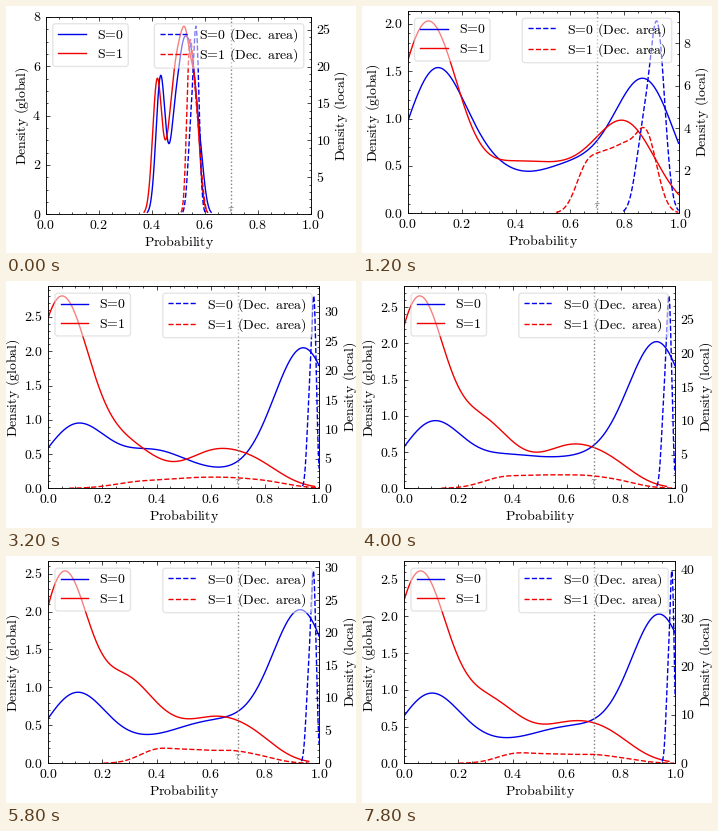
These frames come from a looping animation (350x247 px, 8 s). A matplotlib script:

```python
import math

import numpy as np
import matplotlib.pyplot as plt
from matplotlib.animation import FuncAnimation
from matplotlib.lines import Line2D
from matplotlib.patches import FancyBboxPatch
from matplotlib.ticker import NullFormatter
from matplotlib.transforms import Affine2D

W, H, DPI = 350, 247, 100
FRAMES, INTERVAL = 40, 200
EM = 10 * DPI / 72
DIGIT, DOT = 0.5 * EM, 0.278 * EM
TAU = 0.7
COLORS = "#0000ec", "#f00000"
T = np.linspace(0, 1, 1201)

plt.rcParams.update({
    "mathtext.fontset": "cm", "font.size": 10, "axes.linewidth": 0.5,
    "xtick.top": True, "lines.linewidth": 1.0,
})
for name in ("xtick", "ytick"):
    plt.rcParams.update({
        f"{name}.direction": "in", f"{name}.minor.visible": True,
        f"{name}.major.size": 3, f"{name}.minor.size": 1.5,
        f"{name}.major.width": 0.5, f"{name}.minor.width": 0.5,
    })

fig = plt.figure(figsize=(W / DPI, H / DPI), dpi=DPI, facecolor="white")
# pixel coordinates with the origin at the top left
px = Affine2D().scale(1 / DPI, -1 / DPI).translate(0, H / DPI) + fig.dpi_scale_trans


def peak(width, x, y):
    """One peak with a shoulder on its left side."""
    return width, x, y, x - 2 * width, y / 2


# Each density: kernel width, then a few points x, y that it passes through.
# Order: global S=0, global S=1, local S=0, local S=1.
KEYS = {
    0: ((.017, .433, 5.62, .463, 2.88, .49, 4.9, .52, 7.1, .55, 6.65, .58, 3.4),
        (.017, .42, 5.5, .449, 3.05, .475, 4.9, .5, 6.9, .528, 7.5, .562, 5.5),
        peak(.011, .568, 25.3),
        (.01, .54, 21.8, .555, 21, .572, 13.5, .588, 5.8)),
    6: ((.11, .1, 1.53, .28, .78, .44, .444, .6, .56, .74, .94, .88, 1.417),
        (.11, .074, 2.03, .22, 1.04, .36, .56, .52, .545, .66, .7, .81, .97),
        peak(.027, .922, 9),
        (.04, .66, 2.45, .73, 2.97, .8, 3.35, .88, 3.95)),
    10: ((.1, .16, 1.02, .3, .88, .42, .76, .54, .55, .7, .89, .88, 1.86),
         (.08, .07, 2.06, .2, 1.28, .31, 1.41, .49, .705, .63, .86, .8, .52),
         peak(.028, .919, 11.3),
         (.06, .49, 2, .62, 3.08, .74, 2.2, .86, .85)),
    16: ((.11, .1, .945, .25, .67, .4, .565, .59, .325, .77, .75, .945, 2.05),
         (.1, .044, 2.8, .17, 1.68, .29, .78, .41, .44, .6, .56, .76, .46),
         peak(.009, .981, 32.5),
         (.09, .33, 1.2, .5, 1.75, .65, 1.88, .8, 1.35)),
    24: ((.11, .105, .925, .22, .66, .36, .395, .54, .555, .7, .725, .93, 2.02),
         (.09, .058, 2.49, .18, 1.56, .28, 1.28, .45, .69, .61, .645, .75, .465),
         peak(.0105, .975, 24.15),
         (.065, .4, 2.3, .53, 2.22, .66, 2.05, .77, 1.3)),
    39: ((.11, .09, .95, .22, .645, .37, .35, .55, .475, .71, .625, .945, 2.03),
         (.1, .052, 2.61, .18, 1.63, .3, .97, .42, .665, .6, .57, .75, .475),
         peak(.0078, .989, 39.5),
         (.07, .41, 2.1, .55, 1.95, .69, 1.85, .81, 1.1)),
}
STEPS = sorted(KEYS)


def density(params):
    """Sum of Gaussian kernels whose heights fit the given points."""
    width, x, y = params[0], params[1::2], params[2::2]

    def kernel(t):
        return np.exp(-0.5 * ((t[:, None] - x) / width) ** 2)

    return np.maximum(kernel(T) @ np.linalg.solve(kernel(x), y), 0)


def curves_at(step):
    hi = next(k for k in STEPS[1:] if k >= step)
    lo = STEPS[STEPS.index(hi) - 1]
    s = (step - lo) / (hi - lo)
    curves = []
    for i, ends in enumerate(zip(KEYS[lo], KEYS[hi])):
        a, b = map(np.array, ends)
        y = density(a + (b - a) * s)
        if i < 2:  # the mass of a global density changes evenly
            y *= (density(a).sum() * (1 - s) + density(b).sum() * s) / y.sum()
        curves.append(np.where(y > 0.01 * y.max(), y, np.nan))
    return curves


def ticks_for(top):
    """Tick values, their labels and the widest label in pixels."""
    raw = top / 7
    mag = 10 ** math.floor(math.log10(raw))
    unit = next(u for u in (1, 2, 2.5, 5, 10) if u * mag >= raw)
    step = unit * mag
    places = next(p for p in range(4)
                  if abs(step * 10**p - round(step * 10**p)) < 1e-9)
    values = np.arange(0, top, step)
    labels = [f"{v:.{places}f}" for v in values]
    longest = max(labels, key=len)
    wide = DIGIT * len(longest.replace(".", "")) + DOT * ("." in longest)
    return values, labels, wide


def rm(s):
    s = s.replace("=", r"\hspace{-0.2}=\hspace{-0.2}")
    s = s.replace(". ", r".\hspace{0.306}").replace(" ", r"\hspace{0.38}")
    return r"$\mathrm{" + s + "}$"


def write(host, x, y, s, ha="center", **kw):
    host.text(x, y, s, ha=ha, va="baseline", transform=px, **kw)


def legend(ax, x, y, w, rise, drop, style, names):
    row = rise + drop
    ax.add_artist(FancyBboxPatch(
        (x, y), w, 1.3 * EM + 2 * row, fc="white", ec="0.8", lw=1, alpha=0.5,
        boxstyle=f"round,pad=0,rounding_size={0.2 * EM}", transform=px, zorder=5))
    for i, (name, color) in enumerate(zip(names, COLORS)):
        base = y + 0.4 * EM + rise + i * (row + 0.5 * EM)
        ends = x + 0.4 * EM, x + 2.4 * EM
        ax.add_artist(Line2D(ends, [base - 0.35 * EM] * 2, color=color,
                             ls=style, transform=px, zorder=6))
        write(ax, x + 3.2 * EM, base, rm(name), "left", zorder=6)


def draw(step):
    fig.clear()
    curves = curves_at(step)
    tops = [1.05 * np.nanmax(pair) for pair in (curves[:2], curves[2:])]
    (lv, ll, lw), (rv, rl, rw) = map(ticks_for, tops)

    # a tick label near the top edge makes the whole plot shrink a little
    gaps = [202 * (1 - v[-1] / top) for v, top in zip((lv, rv), tops)]
    extra = max(0, 5.8 - min(gaps))
    k = H / (H + extra)
    left = 36.7 + (lw - rw + DIGIT) / 2
    left, right = (W / 2 + (x - W / 2) * k for x in (left, left + 271))
    top, bottom = (5.3 + extra) * k, (207.3 + extra) * k
    wide, high = right - left, bottom - top

    ax = fig.add_axes([left / W, 1 - bottom / H, wide / W, high / H])
    twin = ax.twinx()
    for a, pair, style, lim, values in ((ax, curves[:2], "-", tops[0], lv),
                                        (twin, curves[2:], "--", tops[1], rv)):
        for y, color in zip(pair, COLORS):
            a.plot(T, y, color=color, ls=style)
        a.set_xlim(0, 1)
        a.set_ylim(0, lim)
        a.set_yticks(values)
        a.yaxis.set_major_formatter(NullFormatter())
    ax.axvline(TAU, color="gray", ls=":")
    ax.set_xticks(np.arange(6) / 5)
    ax.xaxis.set_major_formatter(NullFormatter())

    write(ax, left + TAU * wide, bottom - 0.05 / tops[0] * high - 1,
          r"$\tau$", color="gray", fontsize=8)
    pad, small, big = 0.5 * EM, 5.434 * EM, 10.755 * EM
    legend(ax, left + pad, top + pad, small, 0.694 * EM, 0.194 * EM,
           "-", ("S=0", "S=1"))
    legend(twin, right - pad - big, top + pad, big, 0.68 * EM, 0.27 * EM,
           "--", ("S=0 (Dec. area)", "S=1 (Dec. area)"))

    for v in np.arange(6) / 5:
        write(fig, left + v * wide, bottom + 14.5, f"${v:.1f}$")
    for values, labels, lim, x, ha in ((lv, ll, tops[0], left - 4.9, "right"),
                                       (rv, rl, tops[1], right + 4.9, "left")):
        for v, s in zip(values, labels):
            write(fig, x, bottom - v / lim * high + 4.5, f"${s}$", ha)

    mid = (top + bottom) / 2
    turn = dict(rotation=90, rotation_mode="anchor")
    write(fig, (left + right) / 2 + 0.5, bottom + 31.8, rm("Probability"))
    write(fig, left - 13.7 - lw, mid, rm("Density (global)"), **turn)
    write(fig, right + 20.5 + rw, mid, rm("Density (local)"), **turn)
    return []


anim = FuncAnimation(fig, draw, frames=FRAMES, interval=INTERVAL,
                     init_func=lambda: draw(0), repeat=True, repeat_delay=0,
                     blit=False)
plt.show()
```
